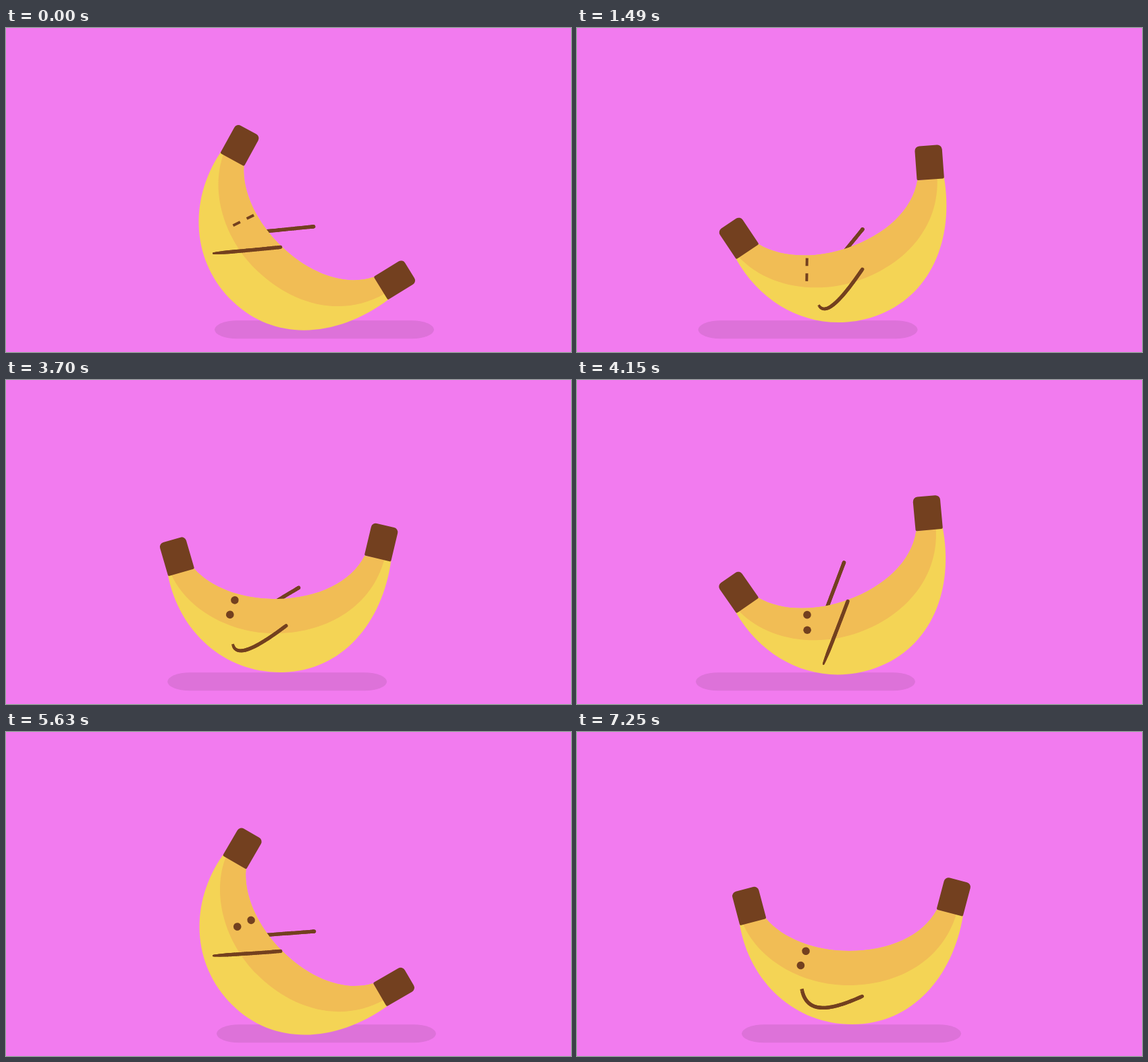
Write an HTML page with a canvas that moves like this. It is 837 px wide and 481 px high and loops after 7350 ms.

```html
<!DOCTYPE html>
<html lang="en">
<head>
<meta charset="utf-8">
<title>Rocking banana</title>
<style>
html, body { margin: 0; width: 100%; height: 100%; overflow: hidden; background: #f27bef; }
canvas { display: block; }
</style>
</head>
<body>
<canvas id="stage" width="837" height="481"></canvas>
<script>
const ctx = document.getElementById('stage').getContext('2d');
const LOOP = 7350, STEP = 148, STEPS = 50;
const CYCLE = 100 / 3, LEAD = 0.33; // in steps
const PIVOT = { x: 406.4, y: 331.4 };
const BACKDROP = '#f27bef', SHADOW = '#dd72d9';
const BROWN = '#73401f', YELLOW = '#f4d455', ORANGE = '#f1bd55';

const INNER = 'M280 277C305 307 353 325 403 325C462 325 512 303 533 264';
const body = new Path2D(INNER + 'L572 272C557 364 496 434 408 434C323 434 256 372 241 286Z');
const flesh = new Path2D(INNER + 'L562 270C542 338 478 376 402 376C335 376 270 340 246 285Z');

const mix = (a, b, t) => a + (b - a) * t;
const mixPoint = (a, b, t) => [mix(a[0], b[0], t), mix(a[1], b[1], t)];

function bezier(a, b, c, d, t) {
  return mix(mix(mix(a, b, t), mix(b, c, t), t), mix(mix(b, c, t), mix(c, d, t), t), t);
}

// cubic-bezier(.42, 0, .58, 1)
function easeInOut(x) {
  let lo = 0, hi = 1;
  for (let i = 0; i < 22; i++) {
    const mid = (lo + hi) / 2;
    if (bezier(0, 0.42, 0.58, 1, mid) < x) lo = mid; else hi = mid;
  }
  return bezier(0, 0, 1, 1, lo);
}

// Eased rise from 0 to 1 that begins at start; both times are parts of the cycle.
const ramp = (p, start, length) => easeInOut(Math.min(1, Math.max(0, (p - start) / length)));

function poseAt(p) {
  const fall = ramp(p, 0.216, 0.05), settle = ramp(p, 0.266, 0.15);
  const windUp = ramp(p, 0.7215, 0.1), rise = ramp(p, 0.9055, 0.0945);
  const eyesOpen = ramp(p, 0, 0.05) - ramp(p, 0.17, 0.07)
    + ramp(p, 0.41, 0.045) - ramp(p, 0.923, 0.05);
  return {
    angle: 45 - 65 * fall + 20 * (settle - windUp) + 65 * rise,
    shift: 68 * (1 - 2 * fall + settle - windUp + 2 * rise),
    eyesOpen,
    reach: 1 - ramp(p, 0.176, 0.219) + ramp(p, 0.713, 0.06)
  };
}

function inPlace(x, y, degrees, paint) {
  ctx.save();
  ctx.translate(x, y);
  ctx.rotate(degrees * Math.PI / 180);
  paint();
  ctx.restore();
}

function box(color, x, y, w, h, radii) {
  ctx.fillStyle = color;
  ctx.beginPath();
  ctx.roundRect(x, y, w, h, radii);
  ctx.fill();
}

function drawCap(x, y, degrees) {
  inPlace(x, y, degrees, () => box(BROWN, -20.2, -48.7, 40.4, 50.4, [7, 7, 2, 2]));
}

function drawEye(x, y, open) {
  const h = mix(4, 11.6, open);
  inPlace(x, y, -70, () => box(BROWN, -5.8, -h / 2, 11.6, h, 5.8 * open * open));
}

// The limb widens from the shoulder to full weight over its first third.
function drawArm(shoulder, bend, wrist, hand, shoulderWidth) {
  const pointAt = t => [0, 1].map(i => bezier(shoulder[i], bend[i], wrist[i], hand[i], t));
  const parts = 40;
  ctx.strokeStyle = BROWN;
  for (let i = 0; i < parts; i++) {
    ctx.lineCap = i < 2 ? 'butt' : 'round';
    ctx.lineWidth = mix(shoulderWidth, 5.3, Math.min(1, 2.5 * i / parts));
    ctx.beginPath();
    ctx.moveTo(...pointAt(i / parts));
    ctx.lineTo(...pointAt((i + 1) / parts));
    ctx.stroke();
  }
}

function draw(p) {
  const { angle, shift, eyesOpen, reach } = poseAt(p);
  const shoulder = mixPoint([-73.4, 50], [-70, 71], reach);
  const bend = mixPoint([-66, 92], [-70, 71], reach);
  const wrist = mixPoint([-24, 79], [-36, 33], reach);
  const hand = mixPoint([16, 61], [-4, -4.5], reach);
  const farHand = [hand[0] + mix(24, 14.5, reach), hand[1] - 56];
  const farElbow = mixPoint([0, 4], [-45, 4], reach);

  ctx.fillStyle = BACKDROP;
  ctx.fillRect(0, 0, 837, 481);
  box(SHADOW, 244 + shift, 434.3, 325, 27, { x: 33, y: 13.5 });

  inPlace(PIVOT.x, PIVOT.y, angle, () => {
    drawArm(farElbow, farElbow, farHand, farHand, 5.3);
    ctx.translate(-PIVOT.x, -PIVOT.y);
    ctx.fillStyle = YELLOW;
    ctx.fill(body);
    ctx.fillStyle = ORANGE;
    ctx.fill(flesh);
    drawCap(260.5, 280.5, -14.8);
    drawCap(552.5, 267, 14.8);
    drawEye(339, 325.2, eyesOpen);
    drawEye(331.4, 346.5, eyesOpen);
    ctx.translate(PIVOT.x, PIVOT.y);
    drawArm(shoulder, bend, wrist, hand, mix(5.3, 2, reach));
  });
}

const start = performance.now();
function tick() {
  const time = Math.max(0, performance.now() - start) % LOOP;
  const step = Math.min(STEPS - 1, Math.floor((time + 8) / STEP));
  draw((step - LEAD + CYCLE) % CYCLE / CYCLE);
  requestAnimationFrame(tick);
}
tick();
</script>
</body>
</html>
```
